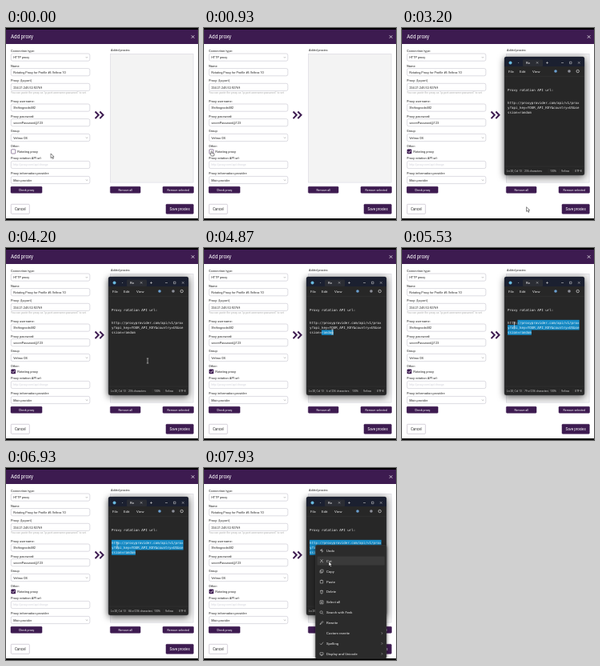
Write an HTML page that moves like this. It is 240 px wide and 240 px high and loops after 8 s.

```html
<!DOCTYPE html>
<html lang="en">
<head>
<meta charset="utf-8">
<title>Add proxy</title>
<style>
  html, body { margin: 0; width: 100%; height: 100%; overflow: hidden; background: #000; }
  svg { display: block; width: 100%; height: 100%; }
  text { font-family: Roboto, Arial, sans-serif; white-space: pre; dominant-baseline: central; }
  .mono { font-family: "DejaVu Sans Mono", monospace; }
  #notepad { filter: drop-shadow(0 2px 4px rgba(0, 0, 0, .65)); }
  #menu { filter: drop-shadow(0 1px 2px rgba(0, 0, 0, .6)); }
</style>
</head>
<body>
<svg id="stage" viewBox="0 0 240 240">
  <g id="dialog"></g>
  <g id="notepad"></g>
  <g id="menu"></g>
  <g id="cursor">
    <path id="arrow" d="M0 0V5.6L1.4 4.4L2.4 6.6L3.4 6.1L2.4 4H4.1Z" fill="#fff" stroke="#111" stroke-width=".5"/>
    <path id="hand" d="M-.6 3.2V.3Q0-.5.6.3V2.2L2.8 2.8Q3.5 3 3.3 3.9L2.7 6H-.2L-1.9 3.7Q-1.4 2.6-.6 3.2Z" fill="#fff" stroke="#111" stroke-width=".5"/>
    <path id="beam" d="M-1.2-3H1.2M0-3V3M-1.2 3H1.2" fill="none" stroke="#ddd" stroke-width=".6"/>
  </g>
</svg>
<script>
const LOOP = 8000, FPS = 15;
const PURPLE = '#3d1b50';
const $ = id => document.getElementById(id);

function add(parent, tag, attrs, content = '') {
  const node = document.createElementNS('http://www.w3.org/2000/svg', tag);
  for (const key in attrs) node.setAttribute(key, attrs[key]);
  node.textContent = content;
  parent.appendChild(node);
  return node;
}
const rect = (parent, x, y, width, height, fill, more) =>
  add(parent, 'rect', { x, y, width, height, fill, ...more });
const label = (parent, x, y, content, size = 4, fill = '#222', more) =>
  add(parent, 'text', { x, y, 'font-size': size, fill, ...more }, content);
const line = (parent, d, stroke, width = .6, more) =>
  add(parent, 'path', { d, stroke, 'stroke-width': width, fill: 'none', ...more });

function button(x, y, w, h, content, size, filled = true) {
  rect(dialog, x, y, w, h, filled ? PURPLE : '#fff',
    { rx: 1, stroke: filled ? PURPLE : '#aaa3b2', 'stroke-width': .5 });
  label(dialog, x + w / 2, y + h / 2 + .2, content, size, filled ? '#fff' : '#333', { 'text-anchor': 'middle' });
}

function field(title, labelY, top, value, { select = false, hint = false } = {}) {
  label(dialog, 6, labelY, title);
  rect(dialog, 6.3, top, 98.5, 9.2, '#fff', { rx: 2, stroke: '#c6c4cf', 'stroke-width': .6 });
  label(dialog, 9.2, top + 4.8, value, hint ? 3.4 : 3.8, hint ? '#cfcfd8' : '#222');
  if (select) line(dialog, `M99.8 ${top + 4.2}l1.1 1.1l1.1-1.1`, '#777', .5);
}

// Dialog
const dialog = $('dialog');
rect(dialog, 0, 2, 240, 236, '#fff');
rect(dialog, 0, 2, 240, 18, PURPLE);
label(dialog, 6, 11.2, 'Add proxy', 6.3, '#fff');
line(dialog, 'M231.8 9.2l3.6 3.6m0-3.6l-3.6 3.6', '#fff', .7);

field('Connection type:', 28, 32, 'HTTP proxy', { select: true });
field('Name', 47, 50.6, 'Rotating Proxy for Profile #6 Veltrox 10');
field('Proxy: (Ip:port)', 65.5, 69.3, '234.21.245.52:50769');
label(dialog, 6, 81.3, 'You can paste the proxy as "ip:port:username:password" to set', 3.4, '#aaa');
field('Proxy username:', 91, 95, 'Shiftingnode482');
field('Proxy password:', 110, 113.6, 'secretPassword@123');
field('Group', 128.8, 132.4, 'Veltrox OS', { select: true });
label(dialog, 6, 147.6, 'Other:');
const box = rect(dialog, 6.6, 151.8, 5.2, 5.2, '#fff', { rx: .6, stroke: PURPLE, 'stroke-width': .5 });
const tick = line(dialog, 'M7.7 154.4l1.2 1.3l2-2.5', '#fff', .8);
label(dialog, 14.2, 154.6, 'Rotating proxy');
field('Proxy rotation API url:', 162.6, 166.4, 'http://proxy.com/api/change', { hint: true });
field('Proxy information provider:', 181.6, 185.4, 'Main provider', { select: true });

line(dialog, 'M111.5 104.5l4.2 4.3l-4.2 4.3M117.3 104.5l4.2 4.3l-4.2 4.3', PURPLE, 2);
label(dialog, 131, 28, 'Added proxies:', 3.7);
rect(dialog, 130.3, 32.3, 103.8, 160.8, '#f3f3f3', { stroke: '#d2d0dc', 'stroke-width': .5 });
button(6, 198.3, 39, 8, 'Check proxy', 3.6);
button(130.3, 198.3, 37.7, 8, 'Remove all', 3.6);
button(196, 198.3, 38.5, 8, 'Remove selected', 3.6);
button(6.3, 220.3, 23, 12, 'Cancel', 4.5, false);
button(200, 220.3, 34.3, 12, 'Save proxies', 4.5);

// Text editor
const notepad = $('notepad');
rect(notepad, 128, 36, 100, 148, '#272727', { rx: 2.5, stroke: '#454850', 'stroke-width': .4 });
add(notepad, 'path', { d: 'M128 48V38.5Q128 36 130.5 36H225.5Q228 36 228 38.5V48Z', fill: '#1b2030' });
add(notepad, 'circle', { cx: 135.5, cy: 43.5, r: 2, fill: '#69b8df' });
label(notepad, 145, 43.5, '•', 4.2, '#ddd');
rect(notepad, 151, 39.5, 25, 8.5, '#2b2d34', { rx: 1.2 });
label(notepad, 155, 43.7, 'Ro', 4.2, '#fff');
line(notepad, 'M168 42.3l2.2 2.2m0-2.2l-2.2 2.2M180 43.5h3m-1.5-1.5v3M199 43.5h3M209.5 42.2h2.5v2.5h-2.5zM220 42.2l2.5 2.5m0-2.5l-2.5 2.5', '#ddd', .5);
[['File', 133], ['Edit', 147], ['View', 163]].forEach(([name, x]) => label(notepad, x, 54, name, 4.4, '#eee'));
add(notepad, 'circle', { cx: 192, cy: 54, r: 1.8, fill: '#6ca0d0' });
add(notepad, 'circle', { cx: 209, cy: 54, r: 1.8, fill: '#8c8f99' });
line(notepad, 'M218 54a1.7 1.7 0 1 0 3.4 0a1.7 1.7 0 1 0-3.4 0', '#ddd', .7);
line(notepad, 'M128 60.3H228M128 173H228', '#3c3c3c', .4);

const LEFT = 132, CHAR = 2.49, MONO = CHAR / .602;
const URL_LINES = ['http://proxyprovider.com/api/v1/prox', 'y?api_key=YOUR_API_KEY&country=US&se', 'ssion=random'];
const URL_LENGTH = URL_LINES.join('').length;
const lineY = i => 93 + i * 6.3;
label(notepad, LEFT, 77.5, 'Proxy rotation API url:', MONO, '#eee', { class: 'mono' });
const marks = URL_LINES.map((content, i) => {
  const mark = rect(notepad, LEFT, lineY(i) - 3.15, 0, 6.3, '#168cc8');
  label(notepad, LEFT, lineY(i), content, MONO, '#eee', { class: 'mono' });
  return mark;
});
label(notepad, 131, 178.6, 'Ln 20, Col 13', 3.3, '#ccc');
const count = label(notepad, 153, 178.6, '', 3.3, '#ccc');
[['100%', 185], ['Veltrox', 199], ['UTF-8', 216]].forEach(([name, x]) => label(notepad, x, 178.6, name, 3.3, '#ccc'));
line(notepad, 'M151.5 176v5M183 176v5M197 176v5M214 176v5', '#444', .3);

// Context menu
const menu = $('menu');
rect(menu, 139.3, 96.3, 88.7, 142, '#2b2b2b', { rx: 2.5, stroke: '#484848', 'stroke-width': .4 });
const hover = rect(menu, 141.5, 110.6, 84.3, 11, '#3a3a3a', { rx: 1.2 });
const ICONS = {
  Undo: 'M1-2L-1.5-.5L1 1M-1.5-.5H1Q3 1 0 2',
  Cut: 'M-1.5-2L1 1.3M1.5-2L-1 1.3M-2 1.5h1M1 1.5h1',
  Copy: 'M-1-2H2V1H-1ZM-1-.8H-2V2H1V1',
  Paste: 'M-1.7-1.5H1.7V2H-1.7ZM-.7-2H.7',
  Delete: 'M-2-1.5H2M-1.4-1.5L-1 2H1L1.4-1.5M-.6-2H.6',
  'Select all': 'M-2-2H2V2H-2ZM-1-.7H1M-1 .7H1',
  'Search with Fenk': 'M-2-.4a1.6 1.6 0 1 0 3.2 0a1.6 1.6 0 1 0-3.2 0M.8.8L2.1 2.1',
  Rewrite: 'M-2 2L-1.3.3L1.3-2L2-1.3L-.5 1.2Z',
  'Custom rewrite': '',
  Spelling: 'M-2 0L-.6 1.6L2-1.7',
  'Display and Unicode': 'M-2-1.5H2V1.2H-2ZM-1 2.1H1'
};
Object.entries(ICONS).forEach(([name, d], i) => {
  const y = 103.3 + i * 12.9;
  line(menu, d, '#ddd', .5, { transform: `translate(147 ${y})` });
  label(menu, 153, y, name, 4.3, '#f0f0f0');
  if (i > 7) line(menu, `M221.8 ${y - 1.2}l1.2 1.2l-1.2 1.2`, '#ccc', .5);
});

// Timeline
const CHECK = 1130, OPEN = 2900, DRAG = 4730, DRAG_END = 5600, MENU = 7270;
const PATH = [
  [0, 56, 157], [200, 54, 157], [800, 9.5, 154], [1350, 9.5, 154], [1950, 70, 244],
  [3000, 150, 244], [3700, 178, 142], [4250, 177, 141], [4650, 162, 105.6],
  [DRAG, 162, 105.6], [DRAG_END, 139, 95], [7000, 139, 96], [7400, 139, 96], [7800, 156, 117], [LOOP, 156, 117]
];
const clamp = v => Math.min(1, Math.max(0, v));
const ease = v => v * v * (3 - 2 * v);
const show = (node, on) => node.setAttribute('visibility', on ? 'visible' : 'hidden');

function cursorAt(t) {
  const i = PATH.findIndex(p => p[0] > t);
  const [t0, x0, y0] = PATH[i - 1], [t1, x1, y1] = PATH[i];
  const k = ease((t - t0) / (t1 - t0));
  return [x0 + (x1 - x0) * k, y0 + (y1 - y0) * k];
}

function draw(t) {
  const checked = t >= CHECK, menuOpen = t >= MENU;
  box.setAttribute('fill', checked ? PURPLE : '#fff');
  show(tick, checked);
  show(notepad, t >= OPEN);
  show(menu, menuOpen);
  notepad.setAttribute('opacity', clamp((t - OPEN) / 130 + .3));

  const selected = Math.round(URL_LENGTH * ease(clamp((t - DRAG) / (DRAG_END - DRAG))));
  let start = 0;
  URL_LINES.forEach((content, i) => {
    const end = start + content.length;
    const from = Math.max(start, URL_LENGTH - selected);
    marks[i].setAttribute('x', LEFT + (from - start) * CHAR);
    marks[i].setAttribute('width', Math.max(0, end - from) * CHAR);
    start = end;
  });
  count.textContent = (selected ? selected + ' of ' : '') + '236 characters';

  const [x, y] = cursorAt(t);
  $('cursor').setAttribute('transform', `translate(${x} ${y})`);
  const onCheckbox = t > 700 && t < 1450;
  const overText = t >= OPEN && !menuOpen && y < 173;
  show($('hand'), onCheckbox);
  show($('beam'), overText);
  show($('arrow'), !onCheckbox && !overText);
  show(hover, menuOpen && y > 110);
}

const began = performance.now();
function tickFrame() {
  const t = (performance.now() - began) % LOOP;
  draw(Math.floor(t * FPS / 1000) * 1000 / FPS);
  requestAnimationFrame(tickFrame);
}
tickFrame();
</script>
</body>
</html>
```
